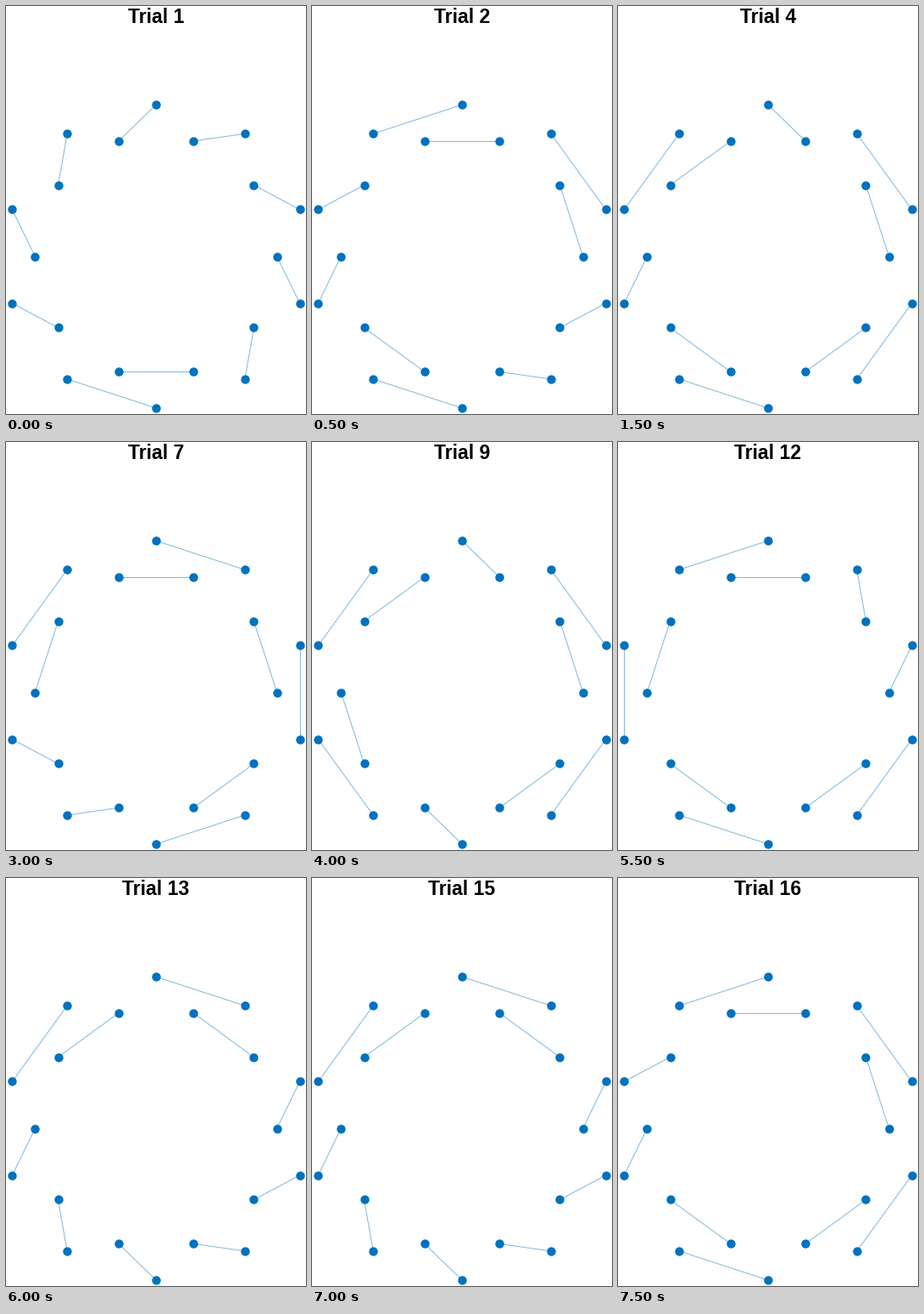
These frames come from a looping animation (354x480 px, 8000 ms). A matplotlib script:

```python
import numpy as np
import matplotlib.pyplot as plt
from matplotlib.animation import FuncAnimation
from matplotlib.collections import LineCollection

W, H, DPI = 354, 480, 100
PX = 72 / DPI
BLUE = "#0072BD"
N = 20
CENTER, RADIUS, INNER = (177, 294.6), 178.4, 0.8

# Nodes run clockwise, alternating between the outer and the inner ring.
# Every trial pairs them up: each start listed here links two interleaved
# pairs (s, s+2) and (s+1, s+3); all other nodes pair with their neighbour.
TRIALS = [
    (9,), (18, 2, 10), (7, 15, 19), (2, 6, 10, 16),
    (11, 17, 1), (3, 11, 15, 19), (19, 3, 7, 15), (8, 12, 16, 2),
    (6, 12, 16, 2), (17, 3, 13), (3, 7, 11, 17), (18, 6, 10, 14),
    (0, 16), (5, 11, 17), (0, 16), (18, 2, 6, 10),
]

node = np.arange(N)
angle = 2 * np.pi * node / N
r = RADIUS * np.where(node % 2, INNER, 1)
points = np.column_stack([CENTER[0] + r * np.sin(angle),
                          CENTER[1] - r * np.cos(angle)])


def matching(doubles):
    pairs = []
    used = set()
    for s in doubles:
        pairs += [(s, s + 2), (s + 1, s + 3)]
        used |= {s, (s + 2) % N}
    for s in range(doubles[0] % 2, N, 2):
        if s not in used:
            pairs.append((s, s + 1))
    return [points[[a % N, b % N]] for a, b in pairs]


fig = plt.figure(figsize=(W / DPI, H / DPI), dpi=DPI, facecolor="white")
ax = fig.add_axes([0, 0, 1, 1])
ax.set_xlim(0, W)
ax.set_ylim(H, 0)
ax.axis("off")

edges = LineCollection([], colors=BLUE, alpha=0.5, linewidths=1.0 * PX, zorder=1)
ax.add_collection(edges)
ax.plot(*points.T, "o", color=BLUE, ms=10.4 * PX, mew=0, zorder=2, clip_on=False)
title = ax.text(W / 2, 19.5, "", ha="center", va="baseline", color="black",
                family="Liberation Sans", weight="bold", size=23 * PX)


def update(i):
    edges.set_segments(matching(TRIALS[i]))
    title.set_text(f"Trial {i + 1}")
    return edges, title


anim = FuncAnimation(fig, update, frames=len(TRIALS), interval=500,
                     repeat=True, repeat_delay=0)
plt.show()
```
